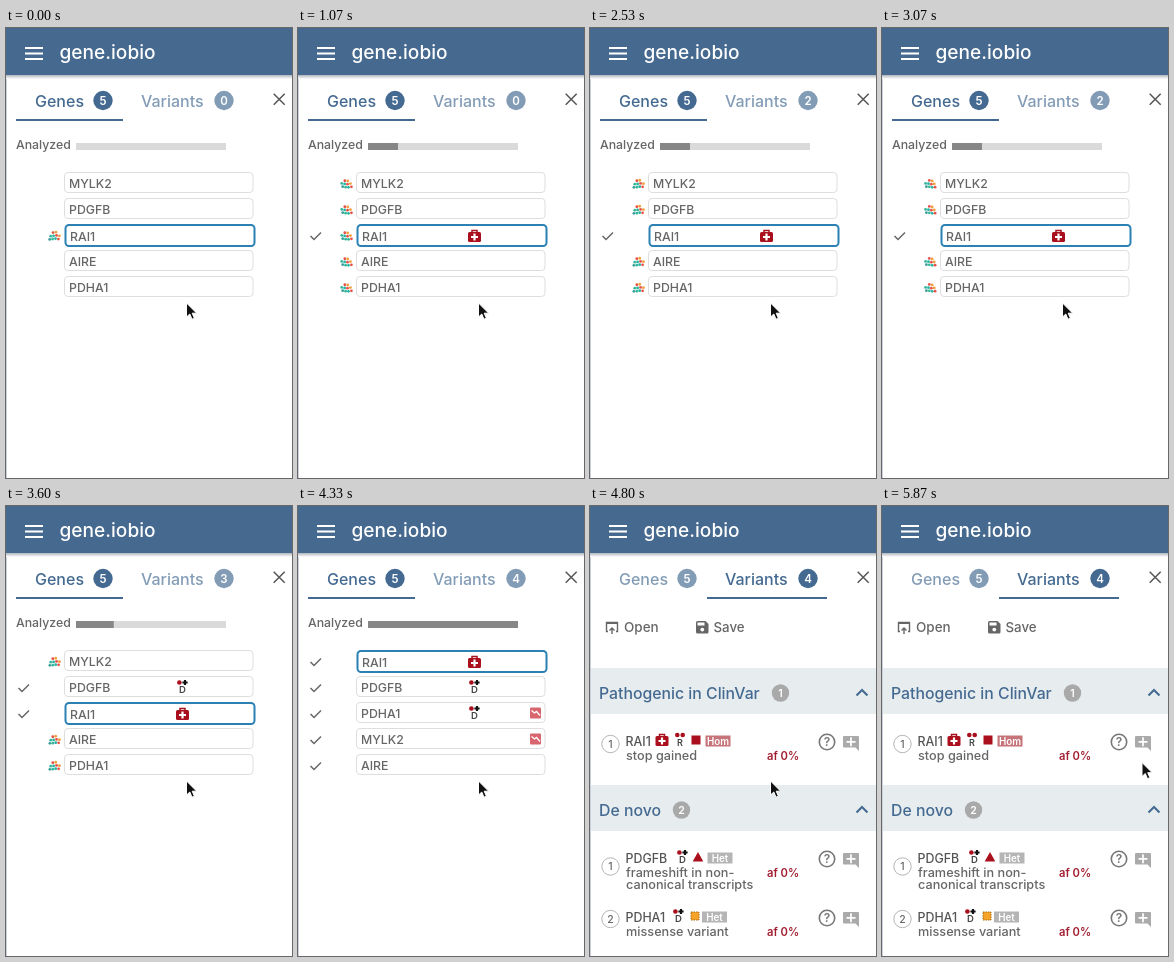
Animation, 286 px wide and 450 px high, one loop 5930 ms. Source, as an HTML page:

```html
<!DOCTYPE html>
<html lang="en">
<head>
<meta charset="utf-8">
<title>Gene panel</title>
<style>
html, body { margin: 0; width: 100%; height: 100%; overflow: hidden; background: #fff; }
svg { display: block; width: 286px; height: 450px; font: 500 12px Inter, "Open Sans", sans-serif; }
</style>
</head>
<body>
<svg id="stage" viewBox="0 0 286 450"></svg>
<script>
const LOOP = 5930, STEP = 1000 / 15;
const BLUE = '#446a91', RED = '#a90f1c', GREY = '#666';
const stage = document.getElementById('stage');

// Timing helpers
const progress = (t, start, length) => Math.min(1, Math.max(0, (t - start) / length));
const smooth = p => p * p * (3 - 2 * p);
const mix = (a, b, p) => a + (b - a) * p;

// cubic-bezier(.25, .8, .5, 1)
function swing(x) {
  if (x <= 0 || x >= 1) return x;
  let lo = 0, hi = 1, s;
  for (let i = 0; i < 20; i++) {
    s = (lo + hi) / 2;
    const at = .75 * (1 - s) ** 2 * s + 1.5 * (1 - s) * s * s + s ** 3;
    if (at < x) lo = s; else hi = s;
  }
  return 2.4 * (1 - s) ** 2 * s + 3 * (1 - s) * s * s + s ** 3;
}

// Drawing helpers
const text = (x, y, s, size, fill = GREY, more = '') =>
  `<text x="${x}" y="${y}" font-size="${size}" fill="${fill}" ${more}>${s}</text>`;
const middle = (x, y, s, size, fill, weight = 500) =>
  text(x, y, s, size, fill, `text-anchor="middle" font-weight="${weight}"`);
const rect = (x, y, w, h, fill, more = '') =>
  `<rect x="${x}" y="${y}" width="${w}" height="${h}" fill="${fill}" ${more}/>`;
const dot = (x, y, r, fill, more = '') =>
  `<circle cx="${x}" cy="${y}" r="${r}" fill="${fill}" ${more}/>`;
const line = (d, color, width) =>
  `<path d="${d}" fill="none" stroke="${color}" stroke-width="${width}"/>`;
const shape = (d, fill, more = '') => `<path d="${d}" fill="${fill}" ${more}/>`;
const group = (x, y, inner) => `<g transform="translate(${x} ${y})">${inner}</g>`;
const badge = (x, y, r, s, fill, size) => dot(x, y, r, fill) + middle(x, y + size * .36, s, size, '#fff', 600);

// Icons, centred on x, y
const check = (x, y) => line(`M${x - 5} ${y}l3.5 3.5 7-7`, GREY, 1.5);
const medkit = (x, y) => group(x, y,
  line('M-2.5-4v-1.5h5v1.5', RED, 1.5) + rect(-6.5, -4, 13, 10, RED, 'rx="1.5"') +
  line('M-3.5 1h7M0-2.5v7', '#fff', 2.2));
const deNovo = (x, y) => group(x, y,
  dot(-2.6, -4.5, 2.3, RED) + line('M.4-4.5h5.200M3-7.100v5.200', '#111', 2.2) + middle(.3, 6, 'D', 9.5, '#444', 600));
const recessive = (x, y) => group(x, y,
  dot(-2.7, -5, 2.3, RED) + dot(2.7, -5, 2.3, RED) + middle(0, 5.5, 'R', 9, '#444', 600));
const lowCover = (x, y) => group(x, y,
  rect(-5.5, -5.5, 11, 11, '#d8666e', 'rx="1"') + line('M-4-2.5l3 2.5 2-1.5 3.5 4', '#fff', 1.3));
const zygosity = (x, y, s, fill) => rect(x, y, 25, 11, fill) + middle(x + 12.5, y + 9, s, 9.8, '#fff', 600);
const help = (x, y) => dot(x, y, 7.7, 'none', 'stroke="#777" stroke-width="1.6"') + middle(x, y + 4.2, '?', 12, '#777', 600);
const note = (x, y) => group(x, y,
  shape('M-7-7h14a1 1 0 0 1 1 1v14l-3.5-3.5H-7a1 1 0 0 1-1-1V-6a1 1 0 0 1 1-1z', '#aaa') +
  line('M-4.5-1.2h9M0-5.7v9', '#fff', 1.7));

function loader(x, y, t) {
  const colors = ['#26b3a0', '#3c9c9c', '#e5534b', '#35b89a', '#f0a03c'];
  const turn = Math.max(0, t - 470) / 170;
  let dots = '';
  for (let col = 0; col < 4; col++) {
    for (let row = 0; row < 3; row++) {
      const dx = (col - 1.5) * 2.9 + Math.sin(turn + row * 2) * .6;
      const dy = (row - 1) * 3.2 + Math.cos(turn + col * 1.6) * .4;
      if (row || col % 3) dots += dot(dx.toFixed(2), dy.toFixed(2), 1.4, colors[(col * 2 + row * 3) % 5]);
    }
  }
  return group(x, y, dots);
}

function header() {
  return rect(0, 47, 286, 4, 'url(#shade)') + rect(0, 0, 286, 47, '#466a8f') +
    line('M19 20h18M19 25.5h18M19 31h18', '#fff', 2) +
    text(53.5, 31, 'gene.iobio', 19.1, '#fff');
}

function tabs(t) {
  const p = swing(progress(t, 4417, 300));
  const count = t < 1190 ? 0 : t < 3460 ? 2 : t < 3790 ? 3 : 4;
  const tab = (x, s, cx, n, on) => `<g opacity="${mix(.66, 1, on)}">` +
    text(x, 79, s, 16, BLUE) + badge(cx, 72.5, 9.7, n, BLUE, 11.5) + '</g>';
  const left = mix(10, 117, p), right = mix(117, 237, p);
  return tab(29, 'Genes', 97, 5, 1 - p) + tab(135, 'Variants', 218, count, p) +
    rect(left, 91, right - left, 2, BLUE) + line('M267.7 65.7l11 11m0-11l-11 11', '#555', 1.5);
}

function genes(t) {
  const sorted = t >= 3790;
  const names = sorted ? ['RAI1', 'PDGFB', 'PDHA1', 'MYLK2', 'AIRE'] : ['MYLK2', 'PDGFB', 'RAI1', 'AIRE', 'PDHA1'];
  const share = .2 * smooth(progress(t, 0, 260)) + .2 * smooth(progress(t, 3500, 300)) +
    .6 * smooth(progress(t, 3700, 300));
  let out = text(10, 121, 'Analyzed', 12.3) + rect(70, 115, 150, 7, '#dadada') +
    rect(70, 115, 150 * share, 7, '#878787');
  names.forEach((name, i) => {
    const y = 155 + i * 26, active = name === 'RAI1';
    const done = sorted || (active ? t >= 60 : name === 'PDGFB' && t >= 3460);
    const busy = active ? t < 1190 : t >= 460 && !done;
    out += active
      ? rect(59.5, y - 10, 189, 21, '#fff', 'rx="3.5" stroke="#2b80b4" stroke-width="2"')
      : rect(58.5, y - 10.5, 188.5, 20, '#fff', 'rx="3.5" stroke="#dedede"');
    out += text(active ? 64 : 63, y + (active ? 5.5 : 4.7), name, 12.3);
    if (busy) out += loader(48.5, y + .8, t);
    if (done) {
      out += check(17.5, y + 1);
      if (active) out += medkit(176.5, y + 1);
      if (name === 'PDGFB' || name === 'PDHA1') out += deNovo(176, y);
      if (name === 'PDHA1' || name === 'MYLK2') out += lowCover(237.5, y);
    }
  });
  return out;
}

function section(y, title, cx, n) {
  return rect(0, y, 294, 46, '#e7ecee') + text(9, y + 30.5, title, 15.8, BLUE) +
    badge(cx, y + 25, 8.7, n, '#a9a9a9', 10.5) + line(`M266.5 ${y + 27.5}l5.5-5.5 5.5 5.5`, BLUE, 2.1);
}

// y is the baseline of the gene name
function variant(y, n, circleY, gene, effect, icons) {
  return dot(20.5, circleY, 8.7, '#fff', 'stroke="#b5b5b5"') + middle(20.5, circleY + 3.8, n, 10.5, GREY) +
    text(35.5, y, gene, 12.4, '#555') + icons +
    effect.map((s, i) => text(36, y + 14 + i * 12, s, 12.7)).join('') +
    text(177, y + 14, 'af 0%', 11.2, '#a11d30', 'font-weight="600"') +
    help(237, y - 4) + note(261, y - 3);
}

function variants() {
  return rect(0, 95, 294, 355, '#fff') +
    line('M18 125.5h-1.5v-9h11v9h-1.5M16 117.2h12', GREY, 1.4) + line('M22 128v-6m-2.5 2.5l2.5-2.5 2.5 2.5', GREY, 1.4) +
    text(34, 126, 'Open', 13.5) +
    shape('M107.5 115h8l3 3v8a1.5 1.5 0 0 1-1.5 1.5h-9.5a1.5 1.5 0 0 1-1.5-1.5v-9.5a1.5 1.5 0 0 1 1.5-1.5z', GREY) +
    rect(107.5, 116.5, 7, 3, '#fff') + dot(112.3, 123.6, 1.9, '#fff') + text(123.5, 126, 'Save', 13.3) +
    section(162, 'Pathogenic in ClinVar', 190.5, 1) +
    variant(240, 1, 238, 'RAI1', ['stop gained'],
      medkit(72, 234) + recessive(90, 234) + rect(101.5, 229.5, 9, 9, RED) + zygosity(115.5, 229.5, 'Hom', '#c6747a')) +
    section(279, 'De novo', 91.5, 2) +
    variant(357, 1, 360.5, 'PDGFB', ['frameshift in non-', 'canonical transcripts'],
      deNovo(92, 351) + shape('M108 346l5.3 9.5h-10.6z', RED) + zygosity(117.5, 346.5, 'Het', '#b5b5b5')) +
    variant(416, 2, 413, 'PDHA1', ['missense variant'],
      deNovo(88, 410) + rect(101, 406, 8, 8, '#f6a429', 'stroke="#a86a10" stroke-dasharray="1.5 1"') +
      zygosity(112, 405.5, 'Het', '#b5b5b5'));
}

function cursor(t) {
  const p = progress(t, 5733, 133);
  return group(mix(180, 259.5, p), mix(274.5, 256, p),
    shape('M.5.5v14l3.3-3 2.2 5.2 2.4-1-2.2-5h4.5z', '#111', 'stroke="#fff"'));
}

function scene(t) {
  const p = swing(progress(t, 4560, 240));
  return '<defs><linearGradient id="shade" x2="0" y2="1"><stop stop-color="#b0b6be"/>' +
    '<stop offset="1" stop-color="#fff"/></linearGradient></defs>' +
    (p < 1 ? group(-294 * p, 0, genes(t)) : '') +
    (p > 0 ? group(294 * (1 - p), 0, variants()) : '') +
    rect(0, 47, 1, 403, '#cbd1dc') + header() + tabs(t) + cursor(t);
}

let shown = -1;
function tick(now) {
  const step = Math.floor((now % LOOP + 4) / STEP);
  if (step !== shown) stage.innerHTML = scene(step * STEP);
  shown = step;
  requestAnimationFrame(tick);
}
tick(0);
</script>
</body>
</html>
```
